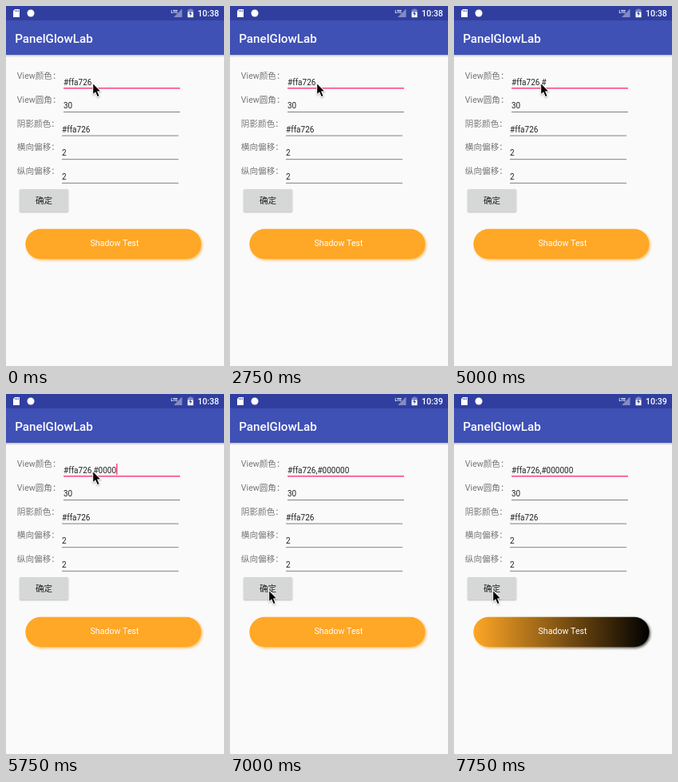
Animation, 273 px wide and 450 px high, one loop 8 s. Source, as an HTML page with a canvas:

```html
<!DOCTYPE html>
<html lang="zh-CN">
<head>
<meta charset="utf-8">
<title>Shadow demo</title>
<style>
html, body { margin: 0; width: 100%; height: 100%; overflow: hidden; background: #fafafa; }
canvas { display: block; width: 273px; height: 450px; }
</style>
</head>
<body>
<canvas id="stage"></canvas>
<script>
const W = 273, H = 450, LOOP = 8000, STEP = 250;
const canvas = document.getElementById('stage');
const ctx = canvas.getContext('2d');
const dpr = window.devicePixelRatio || 1;
canvas.width = W * dpr;
canvas.height = H * dpr;

const FONT = 'Roboto, "Noto Sans CJK SC", "Noto Sans CJK", sans-serif';
const INK = '#212121', PINK = '#ff4081', ORANGE = '#ffa726', WHITE = '#fff';
const BAR = '#303f9f', ROW = 29.6, BLINK = 500;

const INITIAL = '#ffa726', TYPED = ',#000000';
const labels = ['View颜色：', 'View圆角：', '阴影颜色：', '横向偏移：', '纵向偏移：'];
const values = ['', '30', INITIAL, '2', '2'];

// Two slow keys, then zeros every 200 ms, shown on the next screen refresh.
function keyTime(i) {
  if (i < 2) return 3250 + 1250 * i;
  return 5250 + STEP * Math.round((i - 2) * 200 / STEP);
}

function typing(t) {
  let count = 0, since = 250;
  while (count < TYPED.length && t >= keyTime(count)) since = keyTime(count++);
  return {
    entry: INITIAL + TYPED.slice(0, count),
    caret: Math.floor((t - since) / BLINK) % 2 === 0
  };
}

function rect(x, y, w, h, color) {
  ctx.fillStyle = color;
  ctx.fillRect(x, y, w, h);
}

function text(str, x, y, size, color, weight = 400, align = 'left') {
  ctx.font = `${weight} ${size}px ${FONT}`;
  ctx.textAlign = align;
  ctx.fillStyle = color;
  ctx.fillText(str, x, y);
}

function poly(color, ...points) {
  ctx.beginPath();
  points.forEach(([x, y]) => ctx.lineTo(x, y));
  ctx.closePath();
  ctx.fillStyle = color;
  ctx.fill();
}

function round(x, y, w, h, r, color) {
  ctx.beginPath();
  ctx.roundRect(x, y, w, h, r);
  ctx.fillStyle = color;
  ctx.fill();
}

function dropShadow(color, blur) {
  ctx.shadowColor = color;
  ctx.shadowBlur = blur * dpr;
  ctx.shadowOffsetY = dpr;
}

function statusBar(t) {
  rect(0, 0, W, 18, BAR);
  // memory card
  poly(WHITE, [11, 4], [17, 4], [17, 14], [9, 14], [9, 6.3]);
  for (let i = 0; i < 3; i++) rect(11.2 + 1.9 * i, 5.2, 0.9, 2, BAR);
  // notification
  round(26.5, 4.5, 9, 9, 4.5, WHITE);
  // signal
  poly('rgba(255,255,255,.4)', [210, 14], [220.5, 14], [220.5, 3.5]);
  text('LTE', 206.6, 8.8, 5.2, WHITE, 700);
  // battery
  rect(229.5, 3.6, 3, 1, 'rgba(255,255,255,.4)');
  rect(227.5, 4.6, 7, 2.8, 'rgba(255,255,255,.4)');
  rect(227.5, 7.4, 7, 6.8, WHITE);
  poly(BAR, [231.6, 6], [229, 10], [230.8, 10], [230.4, 13], [233, 9], [231.2, 9]);
  text(t < 6000 ? '10:38' : '10:39', 266.8, 13, 10.6, WHITE, 500, 'right');
}

function appBar() {
  rect(0, 18, W, 43, '#3f51b5');
  const fade = ctx.createLinearGradient(0, 61, 0, 64);
  fade.addColorStop(0, 'rgba(0,0,0,.24)');
  fade.addColorStop(1, 'rgba(0,0,0,0)');
  rect(0, 61, W, 3, fade);
  text('PanelGlowLab', 11.2, 45.5, 15.2, WHITE, 500);
}

function form(t) {
  const { entry, caret } = typing(t);
  labels.forEach((label, i) => {
    const x = i < 2 ? 72 : 70, y = ROW * i;
    text(label, 13.8, 91.3 + y, 10.62, '#757575');
    text(values[i] || entry, x, 98.5 + y, 10, INK);
    if (i) rect(x, 102.45 + y, 146, 0.9, '#757575');
    else rect(x, 102, 146, 1.5, PINK);
  });
  if (caret) {
    ctx.font = `400 10px ${FONT}`;
    rect(72 + ctx.measureText(entry).width, 87, 1.5, 14, PINK);
  }
}

function confirmButton(t) {
  const pressed = t >= 7250 && t < 7500;
  ctx.save();
  dropShadow('rgba(0,0,0,.25)', 2);
  round(17, 229, 61, 28, 1.5, pressed ? '#cccece' : '#d6d7d7');
  ctx.restore();
  text('确定', 47.6, 246.9, 10.62, INK, 400, 'center');
}

function pill(t) {
  let paint = ORANGE;
  if (t >= 7250) {
    paint = ctx.createLinearGradient(24, 0, 245, 0);
    paint.addColorStop(0, ORANGE);
    paint.addColorStop(1, '#000');
  }
  const shape = () => round(24.4, 278.7, 220, 37.5, 18.75, paint);
  ctx.save();
  ctx.filter = `blur(${1.8 * dpr}px)`;
  ctx.globalAlpha = 0.7;
  ctx.translate(1.5, 1.5);
  shape();
  ctx.restore();
  shape();
  text('Shadow Test', 136, 300.2, 10.62, WHITE, 400, 'center');
}

function pointer(t) {
  const [x, y] = t < 6500 ? [109, 97] : t < 6750 ? [86, 191] : [49, 246];
  const arrow = () => poly('#000', [0.2, 0.4], [0.2, 12.8], [3.1, 10.2],
    [5.6, 16], [7.5, 15.2], [5, 9.4], [8.8, 9.2]);
  ctx.save();
  ctx.translate(x, y);
  arrow();
  dropShadow('rgba(0,0,0,.3)', 2);
  ctx.strokeStyle = WHITE;
  ctx.lineWidth = 1.8;
  ctx.stroke();
  ctx.shadowColor = 'transparent';
  arrow();
  ctx.restore();
}

function draw() {
  const t = performance.now() % LOOP;
  ctx.setTransform(dpr, 0, 0, dpr, 0, 0);
  rect(0, 0, W, H, '#fafafa');
  statusBar(t);
  appBar();
  form(t);
  confirmButton(t);
  pill(t);
  pointer(t);
  requestAnimationFrame(draw);
}
draw();
</script>
</body>
</html>
```
